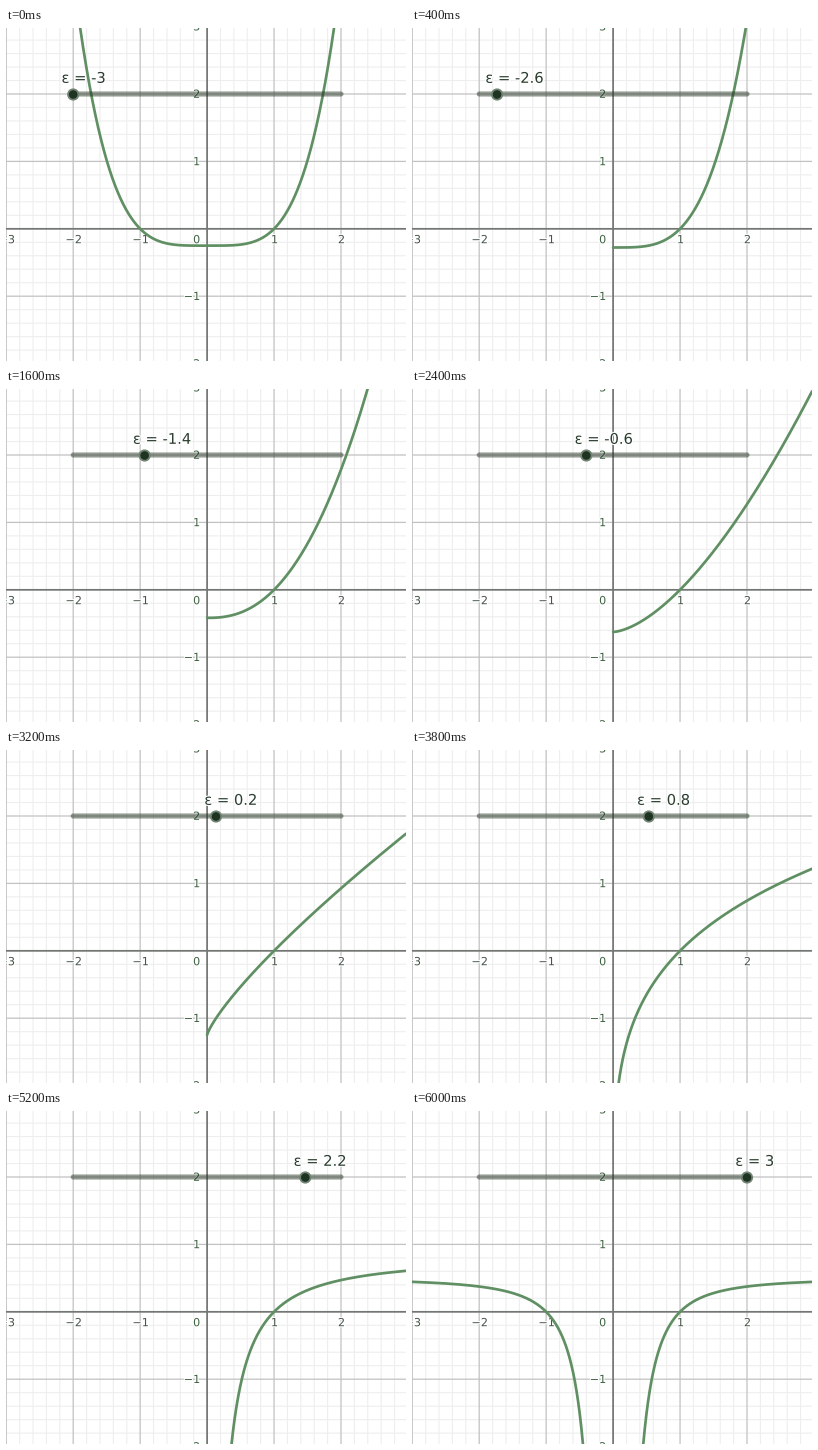
Write a matplotlib script that moves like this. It is 400 px wide and 333 px high and loops after 6200 ms.

```python
import numpy as np
import matplotlib.pyplot as plt
from matplotlib.animation import FuncAnimation
from matplotlib.patches import Circle
from matplotlib.patheffects import withStroke

W, H, DPI = 400, 333, 100
X0, Y0, UX, UY = 201.1, 200.8, 66.95, 67.4
FRAMES, STEP_MS = 31, 200
PT = 72 / DPI
GREEN = "#5f8f62"
SLIDER_Y = 66.0

plt.rcParams["font.family"] = "DejaVu Sans"
fig = plt.figure(figsize=(W / DPI, H / DPI), dpi=DPI, facecolor="white")
ax = fig.add_axes([0, 0, 1, 1])
ax.set(xlim=(0, W), ylim=(H, 0))
ax.axis("off")


def sx(x):
    return X0 + UX * x


def sy(y):
    return Y0 - UY * y


def rule(value, vertical, color, width, z):
    """Straight line across the whole stage, softly antialiased."""
    c = sx(value) if vertical else sy(value)
    xs, ys = ([c, c], [0, H]) if vertical else ([0, W], [c, c])
    ax.plot(xs, ys, color=color, lw=width * PT, snap=False, zorder=z)


def label(x, y, text, size, color, z, **align):
    halo = [withStroke(linewidth=2.2 * PT, foreground="white")]
    return ax.text(x, y, text, fontsize=size * PT, color=color, zorder=z,
                   path_effects=halo, clip_on=True, **align)


def tick(n):
    return str(n).replace("-", "\u2212")


# Grid and axes
for k in range(-15, 16):
    major = k % 5 == 0
    color = "#c2c2c2" if major else "#eeeeee"
    for vertical in (True, False):
        rule(k / 5, vertical, color, 1.25 if major else 1.1, 2 if major else 1)
rule(0, True, "#676b67", 1.5, 3)
rule(0, False, "#737773", 1.7, 3)

for n in (-3, -2, -1, 1, 2):
    label(sx(n) + 0.5, 211.2, tick(n), 11.2, "#455547", 4,
          ha="center", va="center_baseline")
for n in (-2, -1, 1, 2, 3):
    label(194.2, sy(n) - 0.2, tick(n), 11.2, "#3f6242", 4,
          ha="right", va="center_baseline")
label(194.2, 211.2, "0", 11.2, "#3f6242", 4, ha="right", va="center_baseline")

# Curve and slider
curve, = ax.plot([], [], color=GREEN, lw=2.7 * PT, zorder=5,
                 solid_capstyle="round", solid_joinstyle="round")
ax.plot([sx(-2), sx(2)], [SLIDER_Y, SLIDER_Y], color="#172817", alpha=0.46,
        lw=5.1 * PT, solid_capstyle="round", snap=False, zorder=6)
knob = Circle((0, SLIDER_Y + 0.5), 5.2, facecolor="#1f3323",
              edgecolor="#718473", lw=1.8 * PT, zorder=8)
ax.add_patch(knob)
name = label(0, 54.8, "", 14.7, "#2a3d2e", 7, ha="left", va="baseline")

XS = np.linspace(-3.1, 3.1, 6201)
XS[np.abs(XS) < 1e-9] = 0


def utility(x, eps):
    """Isoelastic utility, with the logarithm as its limit at eps = 1."""
    p = round(1 - eps, 1)
    with np.errstate(all="ignore"):
        if p == 0:
            y = np.log(x)
        elif p == int(p):
            y = (x ** int(p) - 1) / p
        else:
            y = (np.power(x, p) - 1) / p
    y[~np.isfinite(y) | (np.abs(y) > 12)] = np.nan
    return y


def update(i):
    eps = (i - 15) / 5
    curve.set_data(sx(XS), sy(utility(XS, eps)))
    x = sx(eps * 2 / 3)
    knob.center = (x, SLIDER_Y + 0.5)
    name.set_x(x - 11.7)
    name.set_text(f"\u03b5 = {eps:g}")
    return curve, knob, name


anim = FuncAnimation(fig, update, frames=FRAMES, interval=STEP_MS,
                     repeat=True, repeat_delay=0, blit=False)
plt.show()
```
